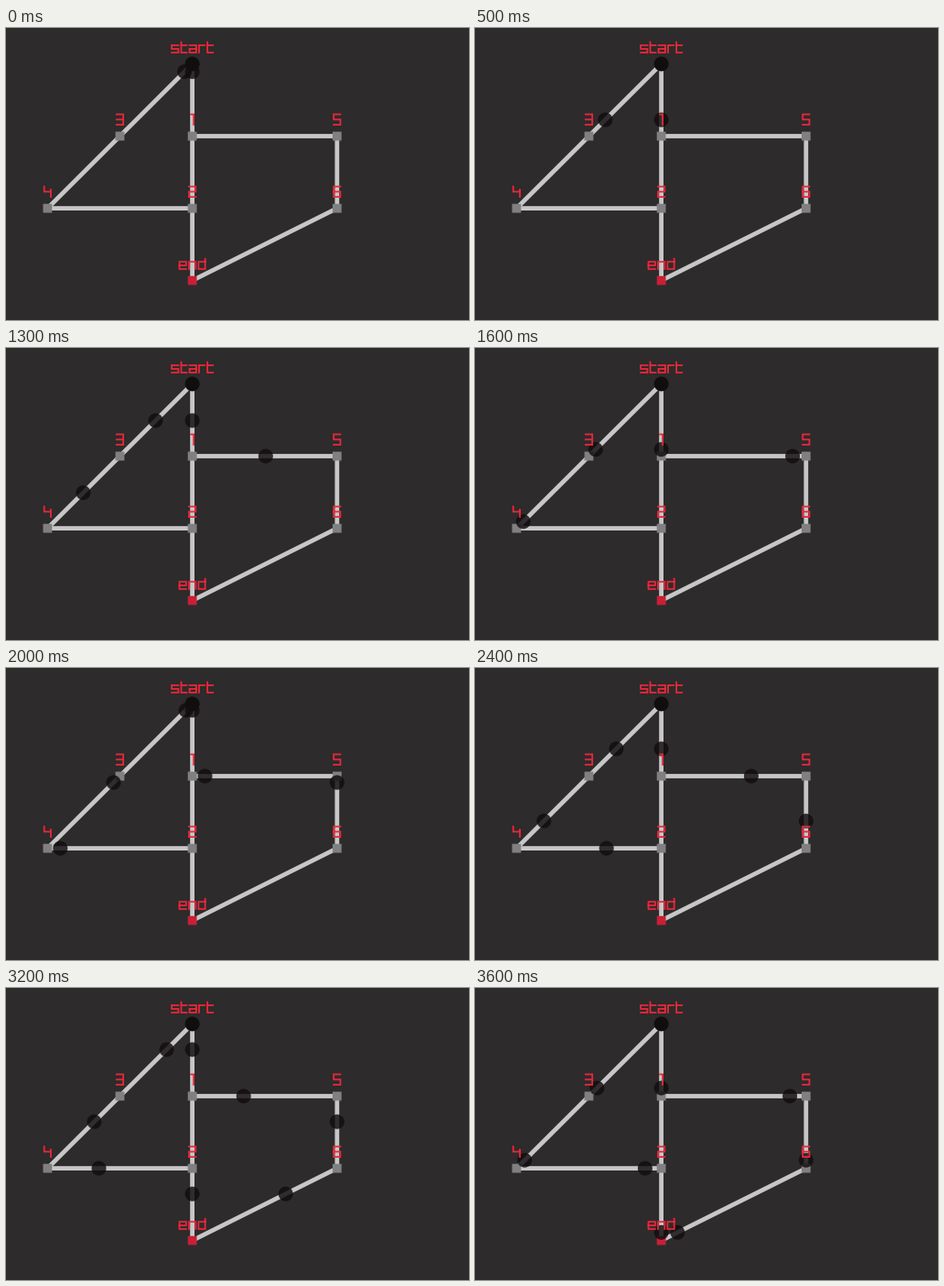
A matplotlib script for the animation above (3700 ms loop, 506x320 px).

```python
from itertools import pairwise

import matplotlib.pyplot as plt
from matplotlib.animation import FuncAnimation
from matplotlib.patches import Circle, Rectangle

W, H, DPI = 506, 320, 64
PT = 72 / DPI  # points per pixel
BG, LINE, NODE = "#2d2b2c", "#c8c7c8", "#808080"
END, TEXT, DOT = "#c91f37", "#e8283a", "#120e0f"

FRAMES, CYCLE = 37, 10  # ten frames per pulse
STEP = 2 / 15           # share of an edge covered per frame
RADIUS, SIDE, CELL = 8, 9.8, 79.1

ROUTES = ["start 1 5 6 end".split(), "start 3 4 2 end".split()]
GRID = {"start": (2, 0), "1": (2, 1), "2": (2, 2), "end": (2, 3),
        "3": (1, 1), "4": (0, 2), "5": (4, 1), "6": (4, 2)}
POS = {k: (45.4 + CELL * x, 39.4 + CELL * y) for k, (x, y) in GRID.items()}

# Letters are strokes over a lattice of two columns and four rows:
# AB cap height, CD x-height, EF middle, GH baseline
GLYPHS = {"s": "DCEFHG", "t": "AGH CD", "a": "CDHGEF", "r": "GCD",
          "e": "HGCDFE", "n": "GCDH", "d": "BHGCD", "1": "ABH",
          "2": "ABFEGH", "3": "ABF EFHG", "4": "AEF DH", "5": "BAEFHG",
          "6": "BAGHFE"}
CAP, XHEIGHT, GAP = 11.4, 8, 3.1
NARROW = {"t": 6, "r": 6, "1": 3}

fig = plt.figure(figsize=(W / DPI, H / DPI), dpi=DPI, facecolor=BG)
ax = fig.add_axes([0, 0, 1, 1])
ax.set(xlim=(0, W), ylim=(H, 0))
ax.axis("off")


def stroke(points, color, width, z, cap="projecting"):
    ax.plot(*zip(*points), color=color, lw=width * PT, zorder=z, snap=False,
            solid_joinstyle="miter", solid_capstyle=cap)


def advance(c):
    return NARROW.get(c, 7.3)


def label(word, cx, base):
    x = cx - (sum(map(advance, word)) + GAP * (len(word) - 1)) / 2
    for c in word:
        rows = CAP, XHEIGHT, (CAP if c.isdigit() else XHEIGHT) / 2, 0
        for path in GLYPHS[c].split():
            spots = [divmod(ord(p) - ord("A"), 2) for p in path]
            stroke([(x + col * advance(c), base - rows[row])
                    for row, col in spots], TEXT, 1.8, 5)
        x += advance(c) + GAP


for road in ROUTES + [["1", "2"]]:
    for a, b in pairwise(road):
        stroke([POS[a], POS[b]], LINE, 4.8, 1, "butt")

for name, (x, y) in POS.items():
    label(name, x, y - 12.5)
    if name == "start":
        ax.add_patch(Circle((x, y), RADIUS, color=DOT, lw=0, zorder=4))
    else:
        ax.add_patch(Rectangle((x - SIDE / 2, y - SIDE / 2), SIDE, SIDE,
                               color=END if name == "end" else NODE,
                               lw=0, zorder=2, snap=False))

# One dot per route edge; an edge joins in once the pulse has reached it
dots = []
for route in ROUTES:
    for depth, (a, b) in enumerate(pairwise(route)):
        dot = Circle(POS[a], RADIUS, color=DOT, alpha=0.83, lw=0, zorder=3)
        dots.append((ax.add_patch(dot), depth, POS[a], POS[b]))


def update(i):
    pulse, k = divmod(i, CYCLE)
    lead = 0.107 - 0.019 * (pulse // 2)  # the clock slips after two pulses
    p = min(1, lead + k * STEP)
    for dot, depth, (x0, y0), (x1, y1) in dots:
        dot.set_visible(depth <= pulse)
        dot.center = x0 + (x1 - x0) * p, y0 + (y1 - y0) * p
    return [d[0] for d in dots]


anim = FuncAnimation(fig, update, frames=FRAMES, interval=100, repeat=True,
                     repeat_delay=0)
plt.show()
```
